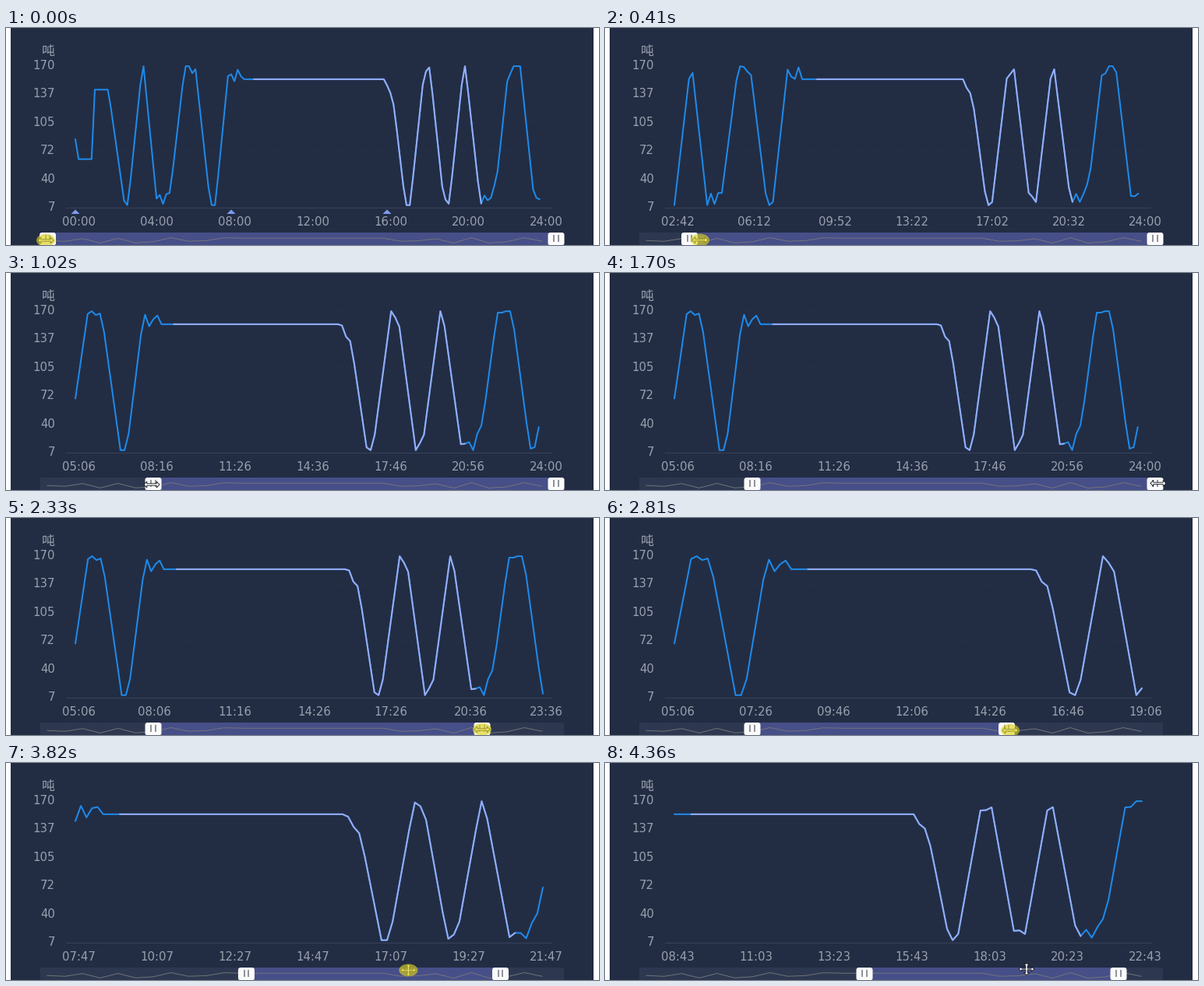
A matplotlib script that plays this animation: 761 by 279 pixels, repeating every 4.55 s.

```python
import numpy as np
import matplotlib.pyplot as plt
from matplotlib.animation import FuncAnimation
from matplotlib.patches import Ellipse, FancyBboxPatch, Polygon, Rectangle

W, H, DPI = 761, 279, 100
INTERVAL, FRAMES = 35, 130
X0, SPAN = 89, 600            # plot area, pixels
TOP, BOTTOM = 48, 230         # pixel rows of the largest and smallest value
HIGH, LOW = 170, 7            # tonnes
DAY = 1440                    # minutes

PANEL, INK, AXIS, GRID = "#222d44", "#99a0ad", "#374157", "#28334a"
BLUE, LILAC = "#1f8aea", "#98acf2"


def rest(level, notch):
    """A short stay at one level, with a notch halfway."""
    def points(a, b, depth=0):
        return [(a, level), ((a + b) / 2, level + notch * depth), (b, level)]
    return points


crest, dip = rest(169, -1), rest(9, 1)

# Turning points of the day: (minute, tonnes), straight lines between.
SERIES = [
    (0, 85), (10, 62), (50, 62), (60, 142), (100, 142), (108, 125),
    *dip(152, 162), *crest(206, 210), *dip(252, 271, 14), (281, 23), (292, 23),
    *crest(337, 351), *crest(351, 369, 8), *dip(416, 431),
    *crest(473, 503, 20), (512, 154), (955, 154), (965, 140), (975, 137),
    (984, 115), *dip(1017, 1031), *crest(1076, 1091, 11),
    *dip(1136, 1151, 12), *crest(1196, 1201), *dip(1248, 1276, 13),
    (1284, 26), (1295, 35), (1302, 52), *crest(1335, 1347, 10),
    *crest(1347, 1370), *dip(1415, 1428, 11), (1440, 49),
]

# Moments at which the picture moves on, in ms: (first, last, count)
RUNS = [(0, 0, 1), (70, 550, 8), (620, 820, 3), (1020, 1510, 8),
        (1570, 1700, 3), (1980, 1980, 1), (2120, 2590, 8), (2660, 2810, 2),
        (2940, 3150, 4), (3480, 3890, 7), (4090, 4360, 2)]
STEPS = np.round(np.concatenate([np.linspace(*run) for run in RUNS]), -1)

# Motion keys: (ms, value)
LEFT = [(0, 53.5), (410, 108.5), (820, 189), (3480, 189), (3890, 333)]
RIGHT = [(2060, 706), (2320, 611), (2590, 508), (2660, 515.5), (3480, 515.5),
         (3890, 659)]
START = [(0, 0), (410, 162), (820, 306), (3480, 306), (3890, 500), (4090, 523)]
END = [(2190, 1440), (2320, 1416), (2590, 1216), (2660, 1216), (2810, 1146),
       (3480, 1146), (3890, 1340), (4090, 1363)]
POINTER_X = [(0, 51), (410, 122), (820, 187), (1020, 187), (1510, 622),
             (1570, 640), (1700, 710), (2060, 710), (2320, 611), (2590, 499),
             (2660, 520), (2810, 520), (3150, 397), (3480, 397), (3890, 541)]
POINTER_Y = [(0, 273), (1020, 272), (1265, 263), (1510, 270), (2810, 273),
             (3480, 273), (3890, 265)]
PRESSED = [(0, 1020), (1980, 2940), (3480, 4360)]


def at(keys, t):
    return np.interp(t, *zip(*keys))


def row(tonnes):
    return np.interp(tonnes, [LOW, HIGH], [BOTTOM, TOP])


def clock(minutes):
    return f"{int(minutes) // 60:02d}:{int(minutes) % 60:02d}"


fig = plt.figure(figsize=(W / DPI, H / DPI), dpi=DPI, facecolor="white")
ax = fig.add_axes([0, 0, 1, 1])
ax.set_xlim(0, W)
ax.set_ylim(H, 0)
ax.axis("off")


def px(width):
    return width * 72 / DPI


def box(x, y, w, h, color, z=1):
    return ax.add_patch(Rectangle((x, y), w, h, fc=color, ec="none", zorder=z))


def label(x, y, text, align, size=14.9, font="DejaVu Sans"):
    return ax.text(x, y, text, ha=align, va="baseline", color=INK,
                   fontsize=px(size), family=font)


def curve(color, z):
    return ax.plot([], [], color=color, lw=px(2), zorder=z,
                   solid_joinstyle="round", solid_capstyle="round")[0]


box(6, 0, 748, H, PANEL, 0)
label(54.5, 34.5, "吨", "center", 17, "Noto Sans CJK JP")
for value, y in zip((170, 137, 105, 72, 40, 7), np.linspace(TOP, BOTTOM, 6)):
    label(63, y + 5, str(value), "right")
    if value > LOW:
        ax.plot([77, 700], [y + .5] * 2, color=GRID, lw=px(.7), ls=(0, (5, 4)))
ax.plot([77, 700], [BOTTOM + .5] * 2, color=AXIS, lw=px(1))

times = [label(0, 254.3, "", "center") for _ in range(7)]
line, middle = curve(BLUE, 3), curve(LILAC, 4)
marks = [ax.add_patch(Polygon([(x - 5.5, 239), (x, 233.5), (x + 5.5, 239)],
                              fc="#7d9cf0", ec="none"))
         for x in (89, 289, 489)]

box(44, 263, 672, 16, "#2d3850")
window = box(0, 263, 1, 16, "#474f88", 2)
coarse = np.arange(0, DAY, 50)
ax.plot(53 + coarse * 653 / DAY, 277 - at(SERIES, coarse) * 7.5 / HIGH,
        color="#77777c", lw=px(.9), zorder=3)


class Handle:
    def __init__(self):
        self.body = ax.add_patch(FancyBboxPatch(
            (0, 263), 21, 16.5, boxstyle="round,pad=0,rounding_size=3",
            fc="#fbfbfc", ec="none", zorder=5))
        self.grip, = ax.plot([], [], color="#777b84", lw=px(1.6), zorder=6,
                             solid_capstyle="butt")

    def move(self, x):
        self.body.set_x(x - 10.5)
        a, b = x - 2.6, x + 2.6
        self.grip.set_data([a, a, np.nan, b, b], [266, 275, np.nan, 266, 275])


handles = Handle(), Handle()
pointer = ax.add_patch(Polygon([(0, 0)], fc="white", ec="#15181f",
                               lw=px(.9), zorder=7))
halo = ax.add_patch(Ellipse((0, 0), 24, 16, fc="#dcd21e", ec="none",
                            alpha=.65, zorder=8))

# One arm of the pointer; turned copies make the two- and four-way shapes.
ARM = np.array([(1.2, -1.2), (6.2, -1.2), (6.2, -4), (10, 0), (6.2, 4),
                (6.2, 1.2)])
TURN = np.array([(0, 1), (-1, 0)])
RESIZE = np.vstack([ARM, -ARM])
MOVE = np.vstack([ARM @ np.linalg.matrix_power(TURN, k) for k in range(4)])
MOVE = MOVE * (1, .75)


def draw_chart(start, end):
    if end >= DAY:
        minutes = np.arange(start, DAY, 10)
        count = len(minutes)
        names = [*minutes, DAY]
    else:
        count = round((end - start) / 10)
        names = minutes = start + 10 * np.arange(count + 1)
    step = SPAN / count
    x = X0 + step * np.arange(len(minutes))
    y = row(at(SERIES, minutes))
    line.set_data(x, y)
    first, last = np.searchsorted(minutes, (545, 1248))
    middle.set_data(x[first:last + 1], y[first:last + 1])
    for k, text in enumerate(times):
        i = int(k * count / 6 + .35 + .1 * k)
        text.set_text(clock(names[i]))
        text.set_x(X0 + 4.5 + step * i)
    for mark in marks:
        mark.set_visible(start == 0)


def draw_slider(t):
    left, right = at(LEFT, t), at(RIGHT, t)
    window.set_x(left)
    window.set_width(right - left)
    for handle, x in zip(handles, (left, right)):
        handle.move(x)
    x, y = at(POINTER_X, t), at(POINTER_Y, t)
    halo.set_center((x, y))
    halo.set_visible(any(a <= t < b for a, b in PRESSED))
    inside = left + 12 < x < right - 12
    free = 1020 < t < 1980 or t > 2810
    pointer.set_xy((MOVE if inside and free else RESIZE) + (x, y))


def update(i):
    now = (i + 1) * INTERVAL - 1
    t = STEPS[STEPS <= now][-1]
    draw_chart(round(at(START, t)), round(at(END, t)))
    draw_slider(t)
    return []


anim = FuncAnimation(fig, update, frames=FRAMES, interval=INTERVAL,
                     init_func=lambda: update(0), repeat=True, repeat_delay=0)
plt.show()
```
